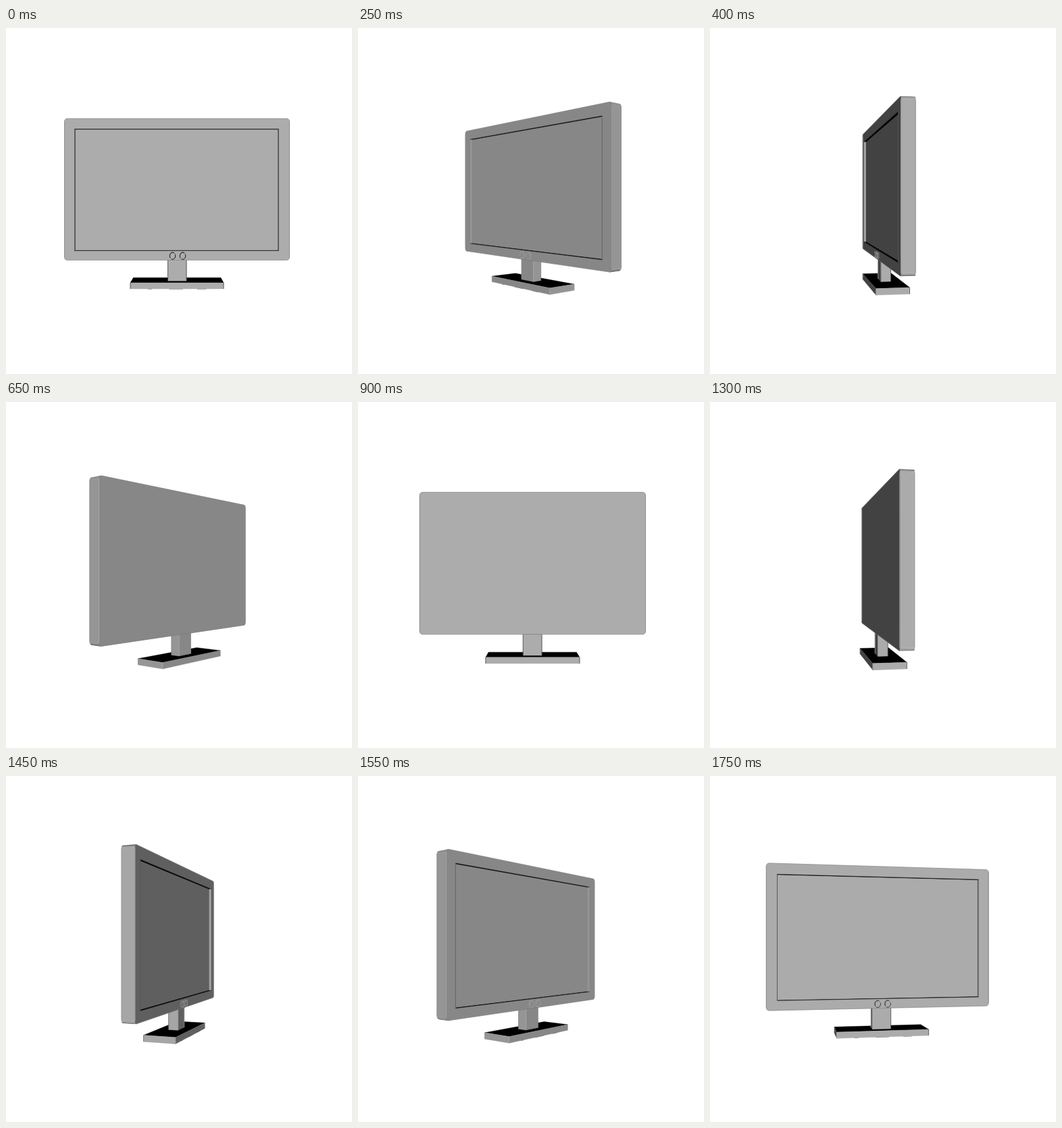
An HTML page with a canvas for the animation above (1800 ms loop, 512 px wide and 512 px high).

```html
<!DOCTYPE html>
<html lang="en">
<head>
<meta charset="utf-8">
<title>Rotating monitor</title>
<style>
  html, body { margin: 0; width: 100%; height: 100%; overflow: hidden; background: #fff; }
  canvas { display: block; width: 512px; height: 512px; }
</style>
</head>
<body>
<canvas id="stage" width="512" height="512"></canvas>
<script>
const ctx = document.getElementById('stage').getContext('2d');
const FOCAL = 715, DISTANCE = 722.5, CENTER_X = 255.7, CENTER_Y = 256;
const STEP_MS = 50, STEPS = 36;

// Boxes in model space: y points down, z points out of the screen.
const panel = { x0: -169.2, x1: 163.8, y0: -122, y1: 87.5, z0: -10, z1: 7.5 };
const opening = { x0: -154.2, x1: 147.8, y0: -106.5, y1: 73.5, z0: 4, z1: 7.5 };
const stand = { x0: -16.3, x1: 11.4, y0: 87.5, y1: 118.7, z0: -10, z1: 4.6 };
const base = { x0: -70.4, x1: 65.1, y0: 118.7, y1: 127.6, z0: -26, z1: 20.8 };
const CORNER = 4;

let cos = 1, sin = 0;

const turn = (x, z) => [x * cos - z * sin, x * sin + z * cos];

function project([x, y, z]) {
  const [px, pz] = turn(x, z);
  const scale = FOCAL / (DISTANCE - pz);
  return [CENTER_X + px * scale, CENTER_Y + y * scale];
}

function isVisible([x, y, z], [nx, ny, nz]) {
  const [px, pz] = turn(x, z), [hx, hz] = turn(nx, nz);
  return hz * (DISTANCE - pz) - hx * px - ny * y > 0;
}

function gray(value) {
  const v = Math.round(value);
  return `rgb(${v},${v},${v})`;
}

// The light sits at the camera, so brightness follows how far a surface faces it.
const shade = ([nx, , nz]) => gray(172 * Math.max(0, turn(nx, nz)[1]) ** 0.55);

function trace(points, closed = true) {
  ctx.beginPath();
  points.forEach(p => ctx.lineTo(...project(p)));
  if (closed) ctx.closePath();
}

function stroke(color, width) {
  ctx.strokeStyle = color;
  ctx.lineWidth = width;
  ctx.stroke();
}

function line(from, to, color, width) {
  trace([from, to], false);
  stroke(color, width);
}

function face(points, normal) {
  if (!isVisible(points[0], normal)) return false;
  const color = shade(normal);
  trace(points);
  ctx.fillStyle = color;
  ctx.fill();
  stroke(color, 0.4);
  return true;
}

const rectAt = (b, z) => [[b.x0, b.y0, z], [b.x1, b.y0, z], [b.x1, b.y1, z], [b.x0, b.y1, z]];
const sideAt = (b, x) => [[x, b.y0, b.z0], [x, b.y0, b.z1], [x, b.y1, b.z1], [x, b.y1, b.z0]];
const levelAt = (b, y) => [[b.x0, y, b.z0], [b.x1, y, b.z0], [b.x1, y, b.z1], [b.x0, y, b.z1]];

// Bright where two visible faces meet; the silhouette takes the hidden face's tone.
function verticalEdges(b, inset, darkest) {
  for (const [x, nx] of [[b.x0, -1], [b.x1, 1]]) {
    for (const [z, nz] of [[b.z0, -1], [b.z1, 1]]) {
      const p = [x, b.y0 + inset, z], q = [x, b.y1 - inset, z];
      const sideSeen = isVisible(p, [nx, 0, 0]), flatSeen = isVisible(p, [0, 0, nz]);
      if (sideSeen && flatSeen) line(p, q, '#aaa', 0.9);
      else if (sideSeen || flatSeen) {
        const facing = Math.abs(sideSeen ? cos : sin);
        line(p, q, gray(Math.max(darkest, 165 * facing ** 0.55)), 0.7);
      }
    }
  }
}

function drawBox(b) {
  face(levelAt(b, b.y0), [0, -1, 0]);
  face(sideAt(b, b.x0), [-1, 0, 0]);
  face(sideAt(b, b.x1), [1, 0, 0]);
  face(rectAt(b, b.z0), [0, 0, -1]);
  face(rectAt(b, b.z1), [0, 0, 1]);
  verticalEdges(b, 0, 50);
}

function roundedOutline(b) {
  const centers = [[b.x1 - CORNER, b.y1 - CORNER], [b.x0 + CORNER, b.y1 - CORNER],
                   [b.x0 + CORNER, b.y0 + CORNER], [b.x1 - CORNER, b.y0 + CORNER]];
  return centers.flatMap(([x, y], quarter) => [0, 1, 2, 3].map(i => {
    const a = (quarter + i / 3) * Math.PI / 2;
    return [x + CORNER * Math.cos(a), y + CORNER * Math.sin(a)];
  }));
}

const outline = roundedOutline(panel);

function drawPanel() {
  outline.forEach(([x, y], i) => {
    const [u, v] = outline[(i + 1) % outline.length];
    const length = Math.hypot(u - x, v - y);
    face([[x, y, panel.z0], [u, v, panel.z0], [u, v, panel.z1], [x, y, panel.z1]],
         [(v - y) / length, (x - u) / length, 0]);
  });
  let front = false;
  for (const [z, nz] of [[panel.z0, -1], [panel.z1, 1]]) {
    const seen = face(outline.map(([x, y]) => [x, y, z]), [0, 0, nz]);
    if (seen) stroke('#777', 0.5);
    if (nz > 0) front = seen;
  }
  verticalEdges(panel, CORNER, 140);
  if (front) {
    drawScreen();
    drawButton(-9.2);
    drawButton(5.8);
  }
}

function drawScreen() {
  const rim = rectAt(opening, opening.z1);
  const [topLeft, topRight, bottomRight, bottomLeft] = rim;
  ctx.save();
  trace(rim);
  ctx.clip();
  face(rectAt(opening, opening.z0), [0, 0, 1]);
  face(levelAt(opening, opening.y0), [0, 1, 0]);
  face(levelAt(opening, opening.y1), [0, -1, 0]);
  const leftSeen = face(sideAt(opening, opening.x0), [1, 0, 0]);
  const rightSeen = face(sideAt(opening, opening.x1), [-1, 0, 0]);
  ctx.restore();
  line(topLeft, topRight, '#1c1c1c', 0.7);
  line(bottomLeft, bottomRight, '#1c1c1c', 0.7);
  if (!leftSeen) line(topLeft, bottomLeft, '#555', 0.7);
  if (!rightSeen) line(topRight, bottomRight, '#555', 0.7);
}

function drawButton(x) {
  const ring = (z, r) => Array.from({ length: 16 }, (_, i) => {
    const a = i * Math.PI / 8;
    return [x + r * Math.cos(a), 81 + (r + 0.8) * Math.sin(a), z];
  });
  const tone = gray(165 * Math.min(1, Math.abs(sin) * 1.3));
  trace(ring(7.5, 4.2));
  stroke(tone, 0.6);
  trace(ring(10, 4.2));
  ctx.fillStyle = shade([0, 0, 1]);
  ctx.fill();
  ctx.setLineDash([9, 2, 13, 3]);
  stroke(tone, 0.8);
  ctx.setLineDash([]);
}

function drawFeet() {
  for (const [from, to] of [[-45, -39], [-14, 6], [27, 40]]) {
    line([from, 127.9, 20], [to, 127.9, 20], '#777', 1);
  }
}

function render(time) {
  const angle = Math.floor(time / STEP_MS) % STEPS * 2 * Math.PI / STEPS;
  cos = Math.cos(angle);
  sin = Math.sin(angle);
  ctx.fillStyle = '#fff';
  ctx.fillRect(0, 0, 512, 512);
  drawFeet();
  drawBox(base);
  drawBox(stand);
  drawPanel();
}

const start = performance.now();
function tick() {
  render(performance.now() - start);
  requestAnimationFrame(tick);
}
tick();
</script>
</body>
</html>
```
